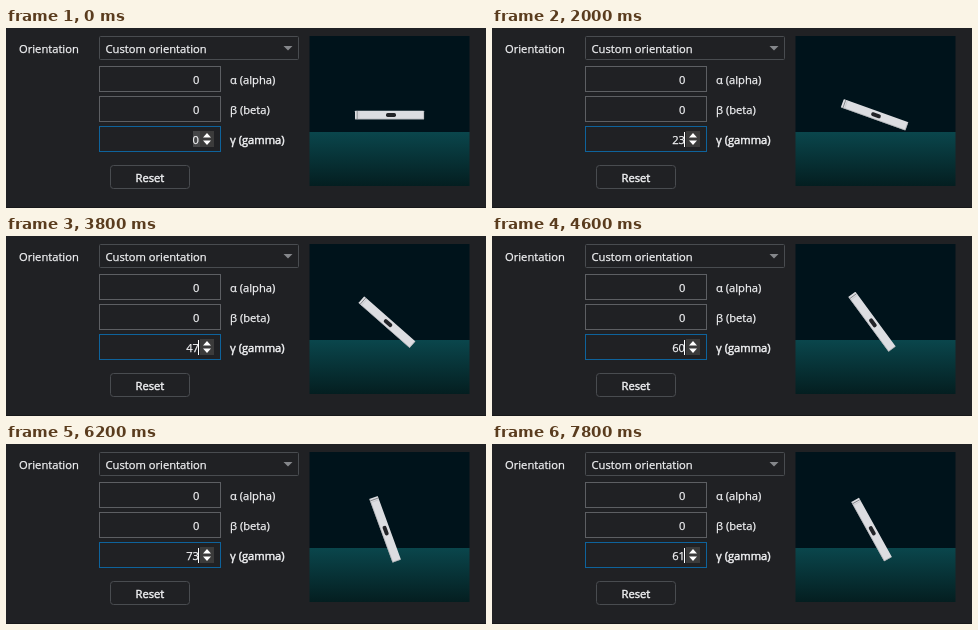
An HTML page that plays this animation: 480x180 px, repeating every 8000 ms.

```html
<!DOCTYPE html>
<html lang="en">
<head>
<meta charset="utf-8">
<title>Orientation</title>
<style>
  html, body { margin: 0; width: 100%; height: 100%; overflow: hidden; background: #202124; }
  svg { display: block; width: 480px; height: 180px; }
  text { font: 11.2px "Open Sans", "Noto Sans", sans-serif; fill: #f1f2f4; stroke: #f1f2f4; stroke-width: .25px; }
  .strong { stroke-width: .45px; }
  .num { text-anchor: end; }
  .box { fill: #202124; stroke: #5d5f63; }
  .quiet { stroke: #494c50; }
  .focus { stroke: #0e639c; }
</style>
</head>
<body>
<svg viewBox="0 0 480 180">
  <defs>
    <linearGradient id="ground" x2="0" y2="1">
      <stop stop-color="#0a464c"/>
      <stop offset="1" stop-color="#041e20"/>
    </linearGradient>
  </defs>
  <rect width="480" height="180" fill="#202124"/>
  <rect y="179" width="480" height="1" fill="#17181a"/>

  <text x="13" y="25">Orientation</text>
  <rect class="box quiet" x="93.5" y="8.5" width="199" height="23" rx="1"/>
  <text x="99.5" y="25">Custom orientation</text>
  <path d="M277.5 18h9l-4.5 4.5z" fill="#85878b"/>

  <rect class="box" x="93.5" y="38.5" width="121" height="25"/>
  <text class="num" x="193.5" y="56">0</text>
  <text x="224" y="56">α (alpha)</text>

  <rect class="box" x="93.5" y="68.5" width="121" height="25"/>
  <text class="num" x="193.5" y="86">0</text>
  <text x="224" y="86">β (beta)</text>

  <rect class="box focus" x="93.5" y="98.5" width="121" height="25"/>
  <rect id="selection" x="187" y="103" width="7" height="16" fill="#454648"/>
  <rect x="194" y="103" width="14" height="16" fill="#3b3b3b"/>
  <path d="M197 109.5h8l-4-4.5zM197 112.5h8l-4 4.5z" fill="#fff"/>
  <text class="num" id="gamma" x="193" y="116">0</text>
  <rect id="caret" x="192" y="104" width="1" height="15" fill="#fff"/>
  <text class="strong" x="224" y="116">γ (gamma)</text>

  <rect class="box quiet" x="104.5" y="137.5" width="79" height="23" rx="3"/>
  <text class="strong" x="129.5" y="154">Reset</text>

  <rect x="303.5" y="8" width="160" height="96" fill="#00131b"/>
  <rect x="303.5" y="104" width="160" height="54" fill="url(#ground)"/>
  <g id="phone">
    <rect x="-34.5" y="-4.3" width="69" height="8.6" rx=".6" fill="#dcdde1"/>
    <path d="M-34.5 4h69M34.2 -4v8" stroke="#a9abaf" stroke-width=".6"/>
    <path d="M-32.3 -4v8" stroke="#77797d" stroke-width=".8"/>
    <path d="M-30.5 -4v8" stroke="#bfc1c5" stroke-width=".6"/>
    <rect x="-3.5" y="-1.9" width="10" height="3.8" rx="1.7" fill="#222327"/>
  </g>
</svg>
<script>
const LOOP = 8000, STEP = 200, LAG = 400;

// Typed value: [time in ms, degrees], straight lines between.
const keys = [[0, 0], [650, 0], [1200, 16], [2400, 27], [3800, 47],
  [5000, 67], [5400, 67], [6500, 75], [7000, 73], [7400, 61], [LOOP, 61]];

const el = id => document.getElementById(id);
const gamma = el("gamma"), caret = el("caret"), selection = el("selection"), phone = el("phone");

function valueAt(t) {
  const i = keys.findIndex(([time]) => time > t);
  const [t0, v0] = keys[i - 1], [t1, v1] = keys[i];
  return v0 + (v1 - v0) * (t - t0) / (t1 - t0);
}

function draw(now) {
  const t = Math.floor(now % LOOP / STEP) * STEP;

  // The model trails behind the typed value.
  const tilt = valueAt(Math.max(0, t - LAG));
  const lean = Math.sin(tilt * Math.PI / 180);
  const x = 383.5 - 4.8 * Math.abs(lean) ** 1.5, y = 87 - 2 * lean ** 2;
  phone.setAttribute("transform",
    `translate(${x} ${y}) rotate(${tilt}) scale(${1 - 0.02 * lean} ${1 + 0.04 * lean})`);

  const editing = t >= LAG;
  gamma.textContent = Math.round(valueAt(t));
  caret.style.display = editing ? "" : "none";
  selection.style.display = editing ? "none" : "";
}

const start = performance.now();
function tick() {
  draw(performance.now() - start);
  requestAnimationFrame(tick);
}
tick();
</script>
</body>
</html>
```
